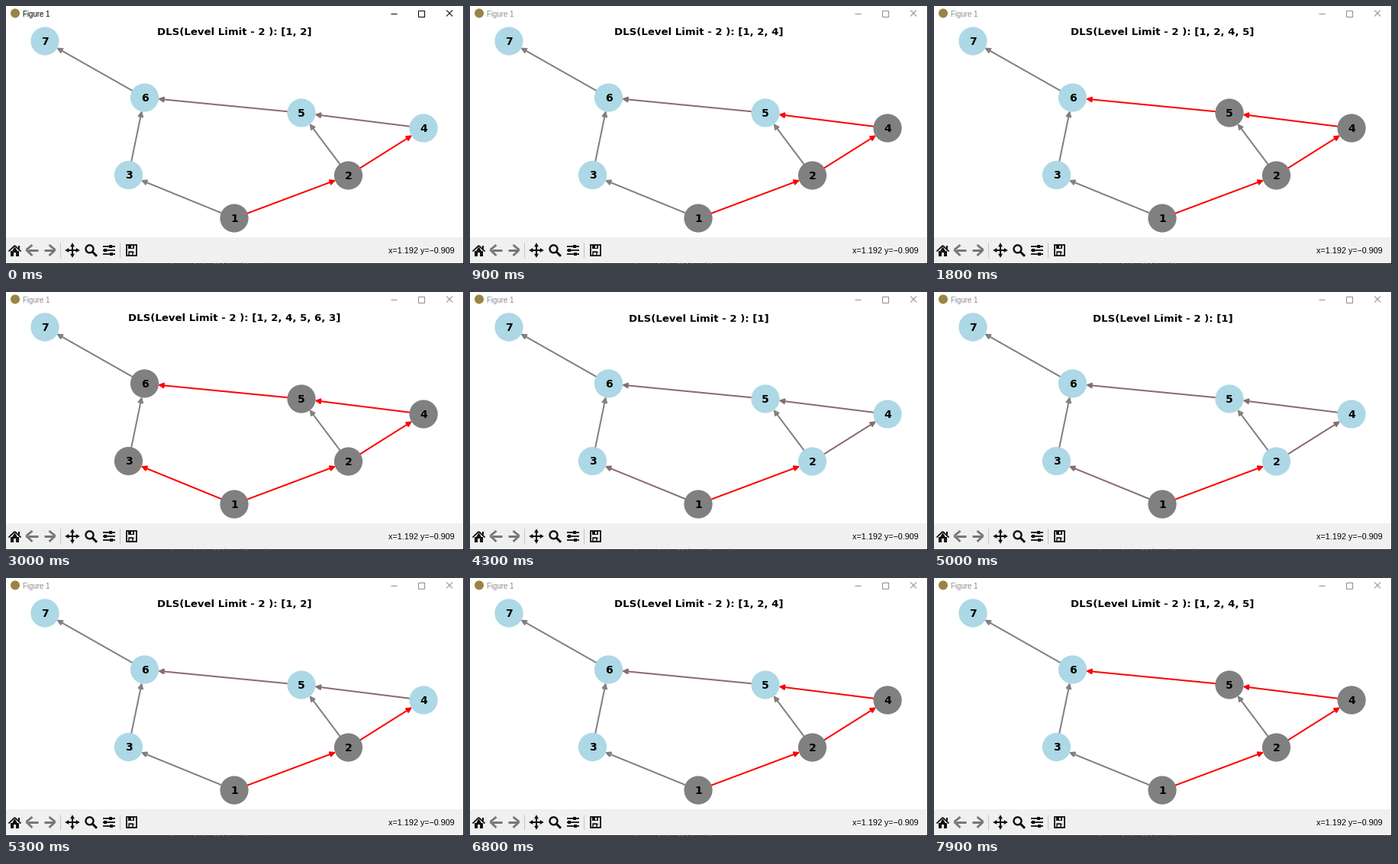
A matplotlib script for the animation above (8 s loop, 600 by 338 pixels).

```python
import numpy as np
import matplotlib.pyplot as plt
from matplotlib.animation import FuncAnimation
from matplotlib.patches import Circle, FancyArrowPatch, Rectangle, RegularPolygon

W, H, DPI = 600, 338, 64
PT = 72 / DPI  # points per pixel
STEP, LOOP = 100, 8000

NODES = {1: (299, 278), 2: (448.5, 222), 3: (160.5, 221.5), 4: (547, 160),
         5: (387, 140), 6: (181.5, 120), 7: (51, 46)}
ORDER = [1, 2, 4, 5, 6, 3]
TREE = [*zip(ORDER, ORDER[1:5]), (1, 3)]  # turned red as the search goes
EDGES = TREE + [(2, 5), (3, 6), (6, 7)]
STARTS = [0, 900, 1800, 3000, 4300, 5300, 6800, 7900]  # ms
COUNTS = [2, 3, 4, 6, 1]  # visited nodes, step by step, repeating
GRAY, BLUE, RED, FADED = "#808080", "#add8e6", "#ff0000", "#8a6c6c"
INK, BAR, DIM = "#111111", "#f0f0f0", "#777777"

fig = plt.figure(figsize=(W / DPI, H / DPI), dpi=DPI, facecolor="white")
ax = fig.add_axes([0, 0, 1, 1])
ax.set_xlim(0, W)
ax.set_ylim(H, 0)
ax.axis("off")


def text(x, y, s, size, color="black", font="Liberation Sans", **kw):
    return ax.text(x, y, s, fontsize=size * PT, color=color, family=font,
                   va="baseline", **kw)


def bold(x, y, s, size):
    return text(x, y, s, size, font="DejaVu Sans", weight="bold",
                ha="center", zorder=5)


def line(x0, y0, x1, y1, width=1.0, color=INK):
    return ax.plot([x0, x1], [y0, y1], lw=width * PT, color=color,
                   solid_capstyle="butt")[0]


def rect(x, y, w, h, color):
    return ax.add_patch(Rectangle((x, y), w, h, fc=color, ec="none"))


def box(x, y, size, width=1.0):
    return ax.add_patch(Rectangle((x, y), size, size, fc="none", ec=INK,
                                  lw=width * PT))


def triangle(x, y, r, angle):
    ax.add_patch(RegularPolygon((x, y), 3, radius=r, orientation=angle,
                                fc=INK, ec="none"))


def title_bar():
    ax.add_patch(Circle((12, 9.5), 6, fc="#9a8444", ec="none"))
    return [text(22, 13.5, "Figure 1", 9.8),
            line(503.5, 9.5, 511.5, 9.5),
            box(539.5, 5.5, 8),
            line(577, 5.5, 585, 13.5),
            line(577, 13.5, 585, 5.5)]


def arrow_icon(x, way):
    tip = x + 7 * way
    line(x - 7 * way, 320, tip - way, 320, 3, DIM)
    for side in (-1, 1):
        line(tip - 7 * way, 320 + 7 * side, tip + way, 319.5 * 1, 2.8, DIM)


def home_icon(x=11.5):
    for side in (-1, 1):
        line(x, 313.8, x + 8 * side, 321.5, 1.8)
        rect(x + 3.5 * side - 2, 321, 4, 6.5, INK)
    triangle(x, 320, 4.8, np.pi)
    rect(x - 5.5, 320.5, 11, 2.5, INK)
    rect(x + 4, 314, 2, 4, INK)


def move_icon(x=87, y=320):
    for k in range(4):
        a = k * np.pi / 2
        dx, dy = np.cos(a), np.sin(a)
        line(x, y, x + 6 * dx, y + 6 * dy, 2)
        triangle(x + 6.4 * dx, y + 6.4 * dy, 3.4, a - np.pi / 2)


def zoom_icon():
    ax.add_patch(Circle((109.5, 318.3), 5, fc="none", ec=INK, lw=2.4 * PT))
    line(113, 321.8, 119, 327.8, 3)


def sliders_icon():
    for k, knob in enumerate((137, 130, 138)):
        y = 315 + 5 * k
        line(126.5, y, 142.5, y, 1.8)
        rect(knob - 1.6, y - 2.2, 3.2, 4.4, INK)


def save_icon(x=157.5, y=313.3):
    box(x, y, 13.5, 1.8)
    rect(x + 2.5, y, 7.5, 5, INK)
    rect(x + 6.5, y + 1, 2, 3, BAR)
    box(x + 3, y + 8.5, 5, 1.5)
    rect(x + 3, y + 8.5, 7.5, 1.5, INK)


def toolbar():
    rect(0, 303, W, H - 304, BAR)
    home_icon()
    arrow_icon(34.5, -1)
    arrow_icon(56.5, 1)
    move_icon()
    zoom_icon()
    sliders_icon()
    save_icon()
    for x in (71, 149):
        line(x, 310, x, 330, 1, "#c4c4c4")
    text(587.3, 323.6, "x=1.192 y=\u22120.909", 10.7, ha="right")
    rect(0, H - 1, W, 1, "#1c1c1c")
    rect(W - 1, 0, 1, H, "#1c1c1c")
    text(203, 343, "node.next_depth(level): value", 8.8, "#a8a8a8",
         "DejaVu Sans Mono")


def edge(a, b):
    return ax.add_patch(FancyArrowPatch(
        NODES[a], NODES[b], arrowstyle="-|>", mutation_scale=14 * PT,
        lw=2 * PT, shrinkA=18.5 * PT, shrinkB=17.5 * PT, color=GRAY))


def node(n):
    x, y = NODES[n]
    bold(x, y + 4.7, str(n), 14)
    return ax.add_patch(Circle((x, y), 18.6, fc=BLUE, ec="none", zorder=2))


chrome = title_bar()
toolbar()
edges = {e: edge(*e) for e in EDGES}
nodes = {n: node(n) for n in NODES}
heading = bold(299.5, 38.5, "", 13.3)


def edge_color(e, count):
    if e in TREE[:count]:
        return RED
    # edges just released keep a trace of red
    trail = TREE[1:] if count == 1 else TREE[count:4]
    return FADED if e in trail else GRAY


def update(i):
    t = i * STEP
    stage = np.searchsorted(STARTS, t, side="right") - 1
    count = COUNTS[stage % len(COUNTS)]
    seen = ORDER[:count]
    heading.set_text(f"DLS(Level Limit - 2 ): {seen}")
    for n, disc in nodes.items():
        disc.set_facecolor(GRAY if n in seen else BLUE)
    for e, arrow in edges.items():
        arrow.set_color(edge_color(e, count))
    for part in chrome:
        shade = "black" if stage == 0 else "#8e8e8e"
        if isinstance(part, Rectangle):
            part.set_edgecolor(shade)
        else:
            part.set_color(shade)
    return [heading, *nodes.values(), *edges.values(), *chrome]


anim = FuncAnimation(fig, update, frames=LOOP // STEP, interval=STEP,
                     repeat=True, repeat_delay=0, blit=False)
plt.show()
```
